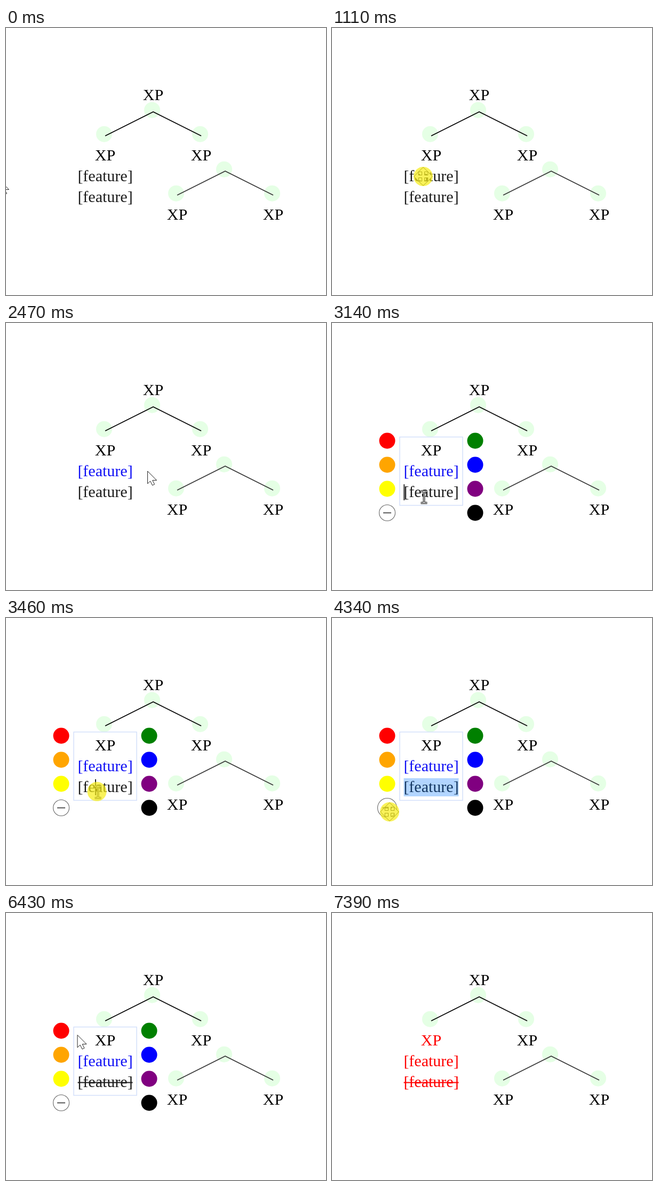
An HTML page with a canvas that plays this animation: 600x500 px, repeating every 7560 ms.

```html
<!DOCTYPE html>
<html lang="en">
<head>
<meta charset="utf-8">
<title>Colouring tree labels</title>
<style>
  html, body { margin: 0; width: 100%; height: 100%; overflow: hidden; background: #fff; }
  canvas { display: block; }
</style>
</head>
<body>
<canvas id="stage" width="600" height="500"></canvas>
<script>
const ctx = document.getElementById('stage').getContext('2d');
const LOOP = 7560, POINTER_GONE = 7390;
const INK = '#1c1c1c', CENTER = 186, FIRST_LINE = 287, SECOND_LINE = 326;

// Each visit presses the label, edits it in the panel, then picks a swatch.
// With a line given, that line is clicked and selected first.
const visits = [
  { press: 1110, open: 1170, pick: 2260, release: 2380, line: FIRST_LINE },
  { press: 2970, open: 3140, pick: 4340, release: 4440, line: SECOND_LINE },
  { press: 5760, open: 5870, pick: 6920, release: 7110 }
];
const CLICK_DELAY = 320, SELECT_DELAY = 100, TAP = 60;
const [blueAt, strikeAt, redAt] = visits.map(v => v.release);

// Pointer legs: where it heads and, if curved, how far the path bows out
const legs = [
  { start: 20, end: 620, to: [171, 278] },
  { start: 1610, end: 1780, to: [265, 277] },
  { start: 2470, end: 2770, to: [170.5, 325] },
  { start: 3680, end: 3810, to: [131, 332] },
  { start: 3910, end: 4040, to: [108, 363] },
  { start: 4600, end: 5330, to: [118, 271], bow: [-88, 55] },
  { start: 5340, end: 5560, to: [175, 237] },
  { start: 6090, end: 6630, to: [115, 224] },
  { start: 7110, end: POINTER_GONE, to: [20, 270] }
];

const swatches = [['red', 'orange', 'yellow', 'white'], ['green', 'blue', 'purple', 'black']]
  .flatMap((column, i) => column.map((color, row) =>
    ({ color, x: 103.5 + 165 * i, y: 220.5 + 45 * row })));

const between = (t, start, end) => t >= start && t < end;
const smooth = p => p * p * (3 - 2 * p);

function pointerAt(t) {
  let from = [-12, 285];
  for (const { start, end, to, bow = [0, 0] } of legs) {
    if (t < start) break;
    if (t < end) {
      const p = smooth((t - start) / (end - start));
      return from.map((v, i) => v + (to[i] - v) * p + bow[i] * Math.sin(Math.PI * p));
    }
    from = to;
  }
  return from;
}

function isPressed(t) {
  return visits.some(({ press, open, pick, release, line }) => {
    const click = open + CLICK_DELAY, second = click + SELECT_DELAY;
    return between(t, press, open) || between(t, pick, release) ||
      line && (between(t, click, click + TAP) || between(t, second, second + TAP));
  });
}

function disc(x, y, r, color) {
  ctx.fillStyle = color;
  ctx.beginPath();
  ctx.arc(x, y, r, 0, 7);
  ctx.fill();
}

function polyline(points, color, width) {
  ctx.strokeStyle = color;
  ctx.lineWidth = width;
  ctx.beginPath();
  points.forEach(([x, y]) => ctx.lineTo(x, y));
  ctx.stroke();
}

function label(text, x, y, color = '#000') {
  ctx.fillStyle = color;
  ctx.fillText(text, x, y);
}

function branch(x, y, lineColor, leftColor) {
  for (const [dx, dy] of [[0, 0], [-90, 45], [90, 45]])
    disc(x - 2, y - 3.3, 15, '#e5ffe5', ctx.translate(dx, dy)), ctx.translate(-dx, -dy);
  polyline([[x - 90, y + 45], [x, y], [x + 90, y + 45]], lineColor, 1.7);
  label('XP', x - 90, y + 91, leftColor);
  label('XP', x + 90, y + 91);
}

function drawPanel(hovered) {
  ctx.strokeStyle = '#d3e0fa';
  ctx.lineWidth = 1.5;
  ctx.strokeRect(127, 213.5, 118, 128);
  for (const swatch of swatches) {
    const { x, y, color } = swatch, r = swatch === hovered ? 18 : 15;
    disc(x, y, r, color);
    if (color === 'white') {
      ctx.strokeStyle = '#666';
      ctx.lineWidth = 1.1;
      ctx.stroke();
      polyline([[x - r / 2, y], [x + r / 2, y]], '#444', 1.8);
    }
  }
}

function drawEditing(t, { open, line }) {
  const click = line ? open + CLICK_DELAY : Infinity;
  ctx.fillStyle = '#000';
  if (t < click) {
    if ((t - open) % 1000 < 500) ctx.fillRect(134.5, SECOND_LINE - 24, 1.5, 30);
  } else if (t < click + SELECT_DELAY) {
    ctx.fillRect(167, line - 24, 1.7, 30);
  } else {
    ctx.fillStyle = 'rgba(0, 115, 255, .3)';
    ctx.fillRect(134.5, line - 26, 103, 34);
  }
}

function outline(points) {
  ctx.beginPath();
  points.forEach(([x, y]) => ctx.lineTo(x, y));
  ctx.closePath();
  ctx.fillStyle = '#fff';
  ctx.fill();
  ctx.strokeStyle = '#222';
  ctx.lineWidth = 1;
  ctx.stroke();
}

const cursors = {
  arrow() {
    outline([[.5, .5], [.5, 24], [5.5, 19], [9.5, 27], [13.5, 25], [9.7, 17.7], [17.5, 17.5]]);
  },
  move() {
    const tip = 17.2, wing = 8.8, shaft = 2.5;
    const arm = [[-shaft, -shaft], [-shaft, -wing], [-wing, -wing], [0, -tip],
      [wing, -wing], [shaft, -wing]];
    const points = [];
    for (let turn = 0, c = 1, s = 0; turn < 4; turn++, [c, s] = [-s, c])
      arm.forEach(([x, y]) => points.push([x * c - y * s, x * s + y * c]));
    outline(points);
  },
  text() {
    for (const [color, width] of [['#111', 3.8], ['#fff', 1.4]]) {
      for (const y of [-10, 12]) polyline([[-4, y], [8, y]], color, width);
      polyline([[2, -10], [2, 12]], color, width);
    }
  }
};

function draw(t) {
  const [x, y] = pointerAt(t);
  const visit = visits.find(v => between(t, v.open, v.release));
  const hovered = visit && swatches.find(s => Math.hypot(s.x - x, s.y - y) < 15);
  const overLabel = between(x, 134, 238) && between(y, 218, 334);
  const red = t >= redAt && 'red';

  ctx.fillStyle = '#fff';
  ctx.fillRect(0, 0, 600, 500);
  ctx.font = '30px "Liberation Serif", "Times New Roman", serif';
  ctx.textAlign = 'center';

  label('XP', 276, 135);
  branch(276, 157, '#000', red || '#000');
  branch(411, 268, '#383838');
  if (visit) drawPanel(hovered);
  label('[feature]', CENTER, FIRST_LINE, red || (t >= blueAt ? '#1010f5' : INK));
  label('[feature]', CENTER, SECOND_LINE, red || INK);
  if (t >= strikeAt) ctx.fillRect(134.5, SECOND_LINE - 9.5, 103, 2);
  if (visit) drawEditing(t, visit);

  if (t >= POINTER_GONE) return;
  ctx.save();
  ctx.translate(x, y);
  cursors[hovered || overLabel && !visit ? 'move' : overLabel ? 'text' : 'arrow']();
  if (isPressed(t)) disc(0, 0, 18, 'rgba(247, 237, 20, .7)');
  ctx.restore();
}

const began = performance.now();
function tick() {
  draw((performance.now() - began) % LOOP);
  requestAnimationFrame(tick);
}
tick();
</script>
</body>
</html>
```
